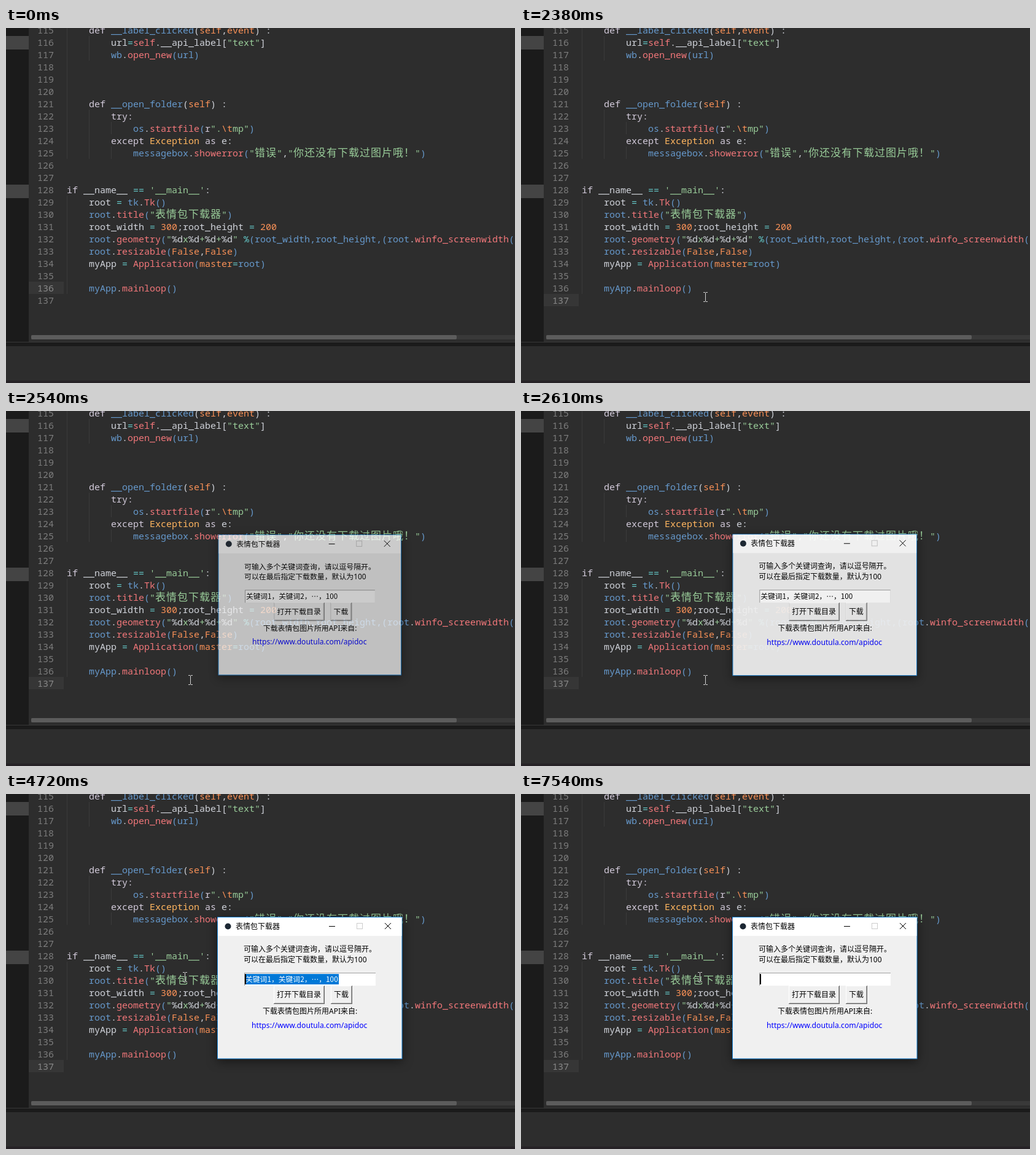
These frames come from a looping animation (829 by 578 pixels, 8 s). An HTML page:

```html
<!DOCTYPE html>
<html lang="zh-CN">
<head>
<meta charset="utf-8">
<title>Editor and downloader</title>
<style>
  html, body { margin: 0; width: 100%; height: 100%; overflow: hidden; background: #2d2d2d; }
  svg { display: block; width: 829px; height: 578px; }
  text { white-space: pre; }
  .code { font: 15px "Noto Sans Mono", "Noto Sans CJK SC", monospace; }
  .wide { font: 17px "Noto Sans CJK SC", "Noto Sans CJK JP", sans-serif; letter-spacing: 1px; }
  .ui { font: 12px "Noto Sans", "Noto Sans CJK SC", "Noto Sans CJK JP", sans-serif; }
  .entry { font: 11.8px "Noto Sans CJK SC", "Noto Sans CJK JP", sans-serif; }
  .link { font: 12.2px "Noto Sans", sans-serif; }
  #frame { filter: drop-shadow(0 4px 8px rgba(0, 0, 0, .5)); }
  #mouse { mix-blend-mode: difference; }
</style>
</head>
<body>
<svg id="stage" viewBox="0 0 829 578" xmlns="http://www.w3.org/2000/svg"></svg>
<script>
const LOOP = 8000;
const HINT = '关键词1，关键词2，…，100';
const WORD = 'tianq';
const CHAR = 9, ROW = 20, FIRST = 115, LAST = 137, CODE_X = 99;
const COLORS = {
  w: '#d0d3da', k: '#d2cada', b: '#6699cc', r: '#f2777a',
  o: '#f99157', y: '#ffb55f', g: '#99cc99', t: '#66cccc'
};

// Tokens are split by bars; the first letter of each is its colour.
const CODE = String.raw`
    kdef |b__label_clicked|w(|oself|w,|oevent|w) :
        wurl|t=|rself|w.__api_label[|g"text"|w]
        bwb|w.|ropen_new|b(url)



    kdef |b__open_folder|w(|oself|w) :
        ktry:
            bos|w.|rstartfile|b(|kr|g".|o\t|gmp"|b)
        kexcept |yException|k as |we:
            bmessagebox|w.|rshowerror|b(|g"|g错误|g"|w,|g"|g你还没有下载过图片哦！|g"|b)


kif |w__name__ |t== |g'__main__'|w:
    wroot |t= |btk|w.|rTk|b()
    broot|w.|rtitle|b(|g"|g表情包下载器|g"|b)
    wroot_width |t= |o300|w;root_height |t= |o200
    broot|w.|rgeometry|b(|g"|w%d|gx|w%d|g+|w%d|g+|w%d|g" |t%|b(root_width,root_height,(root|w.|rwinfo_screenwidth|b(
    broot|w.|rresizable|b(|oFalse|w,|oFalse|b)
    wmyApp |t= |rApplication|b(|omaster|t=|broot)

    bmyApp|w.|rmainloop|b()
`.slice(1).split('\n');

const clamp = v => Math.min(1, Math.max(0, v));
const smooth = p => p * p * (3 - 2 * p);
const rowTop = n => 13 + ROW * (n - FIRST - 1);
const rect = (x, y, w, h, fill, more = '') =>
  `<rect x="${x}" y="${y}" width="${w}" height="${h}" fill="${fill}" ${more}/>`;
const label = (x, y, s, cls = 'ui', fill = '#000', more = '') =>
  `<text x="${x}" y="${y}" class="${cls}" fill="${fill}" ${more}>${s}</text>`;
const isWide = s => /[^\x00-\xff]/.test(s);

// A blank line takes the smaller indent of its neighbours.
function indent(i) {
  if (CODE[i]) return CODE[i].search(/\S/);
  let a = i, b = i;
  while (a > 0 && !CODE[a]) a--;
  while (b < CODE.length - 1 && !CODE[b]) b++;
  return Math.min(CODE[a].search(/\S/), Math.max(0, CODE[b].search(/\S/)));
}

function codeLine(source, i) {
  const y = rowTop(FIRST + i);
  let col = indent(i), out = '';
  for (let c = 0; c < col; c += 4) out += rect(CODE_X + CHAR * c, y, 1, ROW, '#3b3b3b');
  if (!source) return out;
  for (const token of source.trimStart().split('|')) {
    const s = token.slice(1), wide = isWide(s);
    out += label(CODE_X + CHAR * col, y + 16, s, wide ? 'wide' : 'code', COLORS[token[0]]);
    col += s.length * (wide ? 2 : 1);
  }
  return out;
}

function lineNumbers() {
  let out = '';
  for (let n = FIRST; n <= LAST; n++)
    out += label(51, rowTop(n) + 16, n, 'code', '#7d7d7d', `id="n${n}"`);
  return out;
}

const editor = () =>
  rect(0, 0, 829, 578, '#2d2d2d') +
  rect(0, 0, 37, 511, '#1b1b1b') +
  rect(0, 13, 37, 22, '#444') + rect(0, 255, 37, 22, '#444') +
  rect(37, 0, 57, ROW, '#363636', 'id="row"') +
  lineNumbers() + CODE.map(codeLine).join('') +
  rect(41, 500, 788, 7, '#393939') +
  rect(41, 500, 693, 7, '#5c5c5c', 'rx="2"') +
  rect(0, 511, 829, 1, '#383838') + rect(0, 512, 829, 6, '#1b1b1b') +
  rect(0, 574, 829, 4, '#262226') +
  rect(98, rowTop(LAST) - 1, 2, 22, '#d0d3da', 'id="codeCaret"');

const button = (x, w, s) =>
  rect(x, 312, w, 30, '#696969') + rect(x, 312, w - 1, 29, '#fff') +
  rect(x + 1, 313, w - 2, 28, '#a0a0a0') + rect(x + 1, 313, w - 3, 27, '#f0f0f0') +
  label(x + 5, 331, s);

const dialog = () =>
  '<g id="dialog">' +
  rect(344.5, 200.5, 300.5, 230.5, '#f0f0f0', 'stroke="#1883d7" id="frame"') +
  rect(345, 201, 299.5, 30, '#fff') +
  '<circle cx="361.5" cy="215.5" r="5" fill="#1c2733"/>' +
  label(374, 220, '表情包下载器') +
  rect(526, 215, 10, 1, '#000') +
  '<rect x="571.5" y="210.5" width="9" height="9" fill="none" stroke="#ccc"/>' +
  '<path d="M617 210l10 10m0 -10l-10 10" stroke="#000" fill="none"/>' +
  label(387, 257, '可输入多个关键词查询，请以逗号隔开。') +
  label(387, 274, '可以在最后指定下载数量，默认为100') +
  rect(388, 291, 214, 21, '#a0a0a0') + rect(389, 292, 213, 20, '#fff') +
  label(390, 306, HINT, 'entry', '#000', 'id="field"') +
  '<clipPath id="cut">' + rect(390, 293, 152, 17, '#000', 'class="sel"') + '</clipPath>' +
  '<g id="selected">' + rect(390, 293, 152, 17, '#0078d7', 'class="sel"') +
  label(390, 306, HINT, 'entry', '#fff', 'clip-path="url(#cut)"') + '</g>' +
  rect(389, 293, 2, 17, '#000', 'id="caret"') +
  button(436, 83, '打开下载目录') + button(529, 35, '下载') +
  label(418, 358, '下载表情包图片所用API来自:') +
  label(400, 381, 'https://www.doutula.com/apidoc', 'link', '#00f') +
  '</g>';

document.getElementById('stage').innerHTML = editor() + dialog() +
  '<path id="mouse" d="M-3 -7.5h3m1 0h3M-3 7.5h3m1 0h3M.5 -7v14" stroke="#fff" fill="none"/>';

const el = id => document.getElementById(id);
const set = (node, attrs) => {
  for (const name in attrs) node.setAttribute(name, attrs[name]);
};
const show = (node, on) => set(node, { visibility: on ? 'visible' : 'hidden' });

const MOUSE_STEP = 76;
const CLICK = 830, DRAG = 3840, ERASE = 5030, TYPE = 5580, BACKSPACE = 6670;
const MOVES = [
  { from: 70, to: CLICK, x: 300, y: 438 },
  { from: 2840, to: 3300, x: 554, y: 292 },
  { from: 3610, to: 3690, x: 555, y: 299 },
  { from: DRAG, to: 4000, x: 291, y: 298 }
];

// The pointer eases to each stop in visible steps.
function mouseAt(t) {
  let x = 700, y = 526;
  for (const m of MOVES) {
    if (t < m.from) break;
    const steps = Math.floor((m.to - m.from) / MOUSE_STEP) + 1;
    const e = smooth(clamp((Math.floor((t - m.from) / MOUSE_STEP) + 1) / steps));
    x += (m.x - x) * e;
    y += (m.y - y) * e;
  }
  return [Math.round(x), Math.round(y)];
}

// Letters arrive at an even pace; deleting slows down.
function typedCount(t) {
  if (t < BACKSPACE) return Math.min(WORD.length, Math.max(0, Math.floor((t - 5490) / 160)));
  const gone = 1 + (WORD.length - 1) * clamp((t - BACKSPACE) / 870) ** .77;
  return WORD.length - Math.floor(gone);
}

function drawEditor(t) {
  const line = t < CLICK ? LAST - 1 : LAST;
  set(el('row'), { y: rowTop(line) });
  for (const n of [LAST - 1, LAST])
    set(el('n' + n), { fill: n === line ? '#898989' : '#7d7d7d' });
  const focused = t >= CLICK && t < 2380;
  const wave = clamp(.5 + 1.2 * Math.cos(2 * Math.PI * (t - 1075) / 1220));
  set(el('codeCaret'), { opacity: focused ? wave : 0 });
}

function drawDialog(t, mouseX) {
  const open = 1 - (1 - clamp((t - 2390) / 300)) ** 2;
  set(el('dialog'), {
    opacity: open,
    transform: `translate(495 316) scale(${.96 + .04 * open}) translate(-495 -316)`
  });

  const erased = t >= ERASE, selecting = t >= DRAG && !erased;
  const field = el('field');
  field.textContent = erased ? WORD.slice(0, typedCount(t)) : HINT;
  set(field, { class: erased ? 'ui' : 'entry' });

  const left = Math.min(542, Math.max(390, mouseX));
  show(el('selected'), selecting);
  for (const node of document.querySelectorAll('.sel'))
    set(node, { x: left, width: 542 - left });

  const typedWidth = field.textContent ? field.getComputedTextLength() : 0;
  set(el('caret'), { x: selecting ? left - 1 : 389 + Math.floor(typedWidth) });
  show(el('caret'), t >= TYPE || t >= DRAG && (t - 3800) % 900 < 600);
}

function draw(t) {
  const [x, y] = mouseAt(t);
  set(el('mouse'), { transform: `translate(${x} ${y})` });
  show(el('mouse'), t >= MOVES[0].from);
  drawEditor(t);
  drawDialog(t, x);
}

const start = performance.now();
function tick() {
  draw((performance.now() - start) % LOOP);
  requestAnimationFrame(tick);
}
tick();
</script>
</body>
</html>
```
